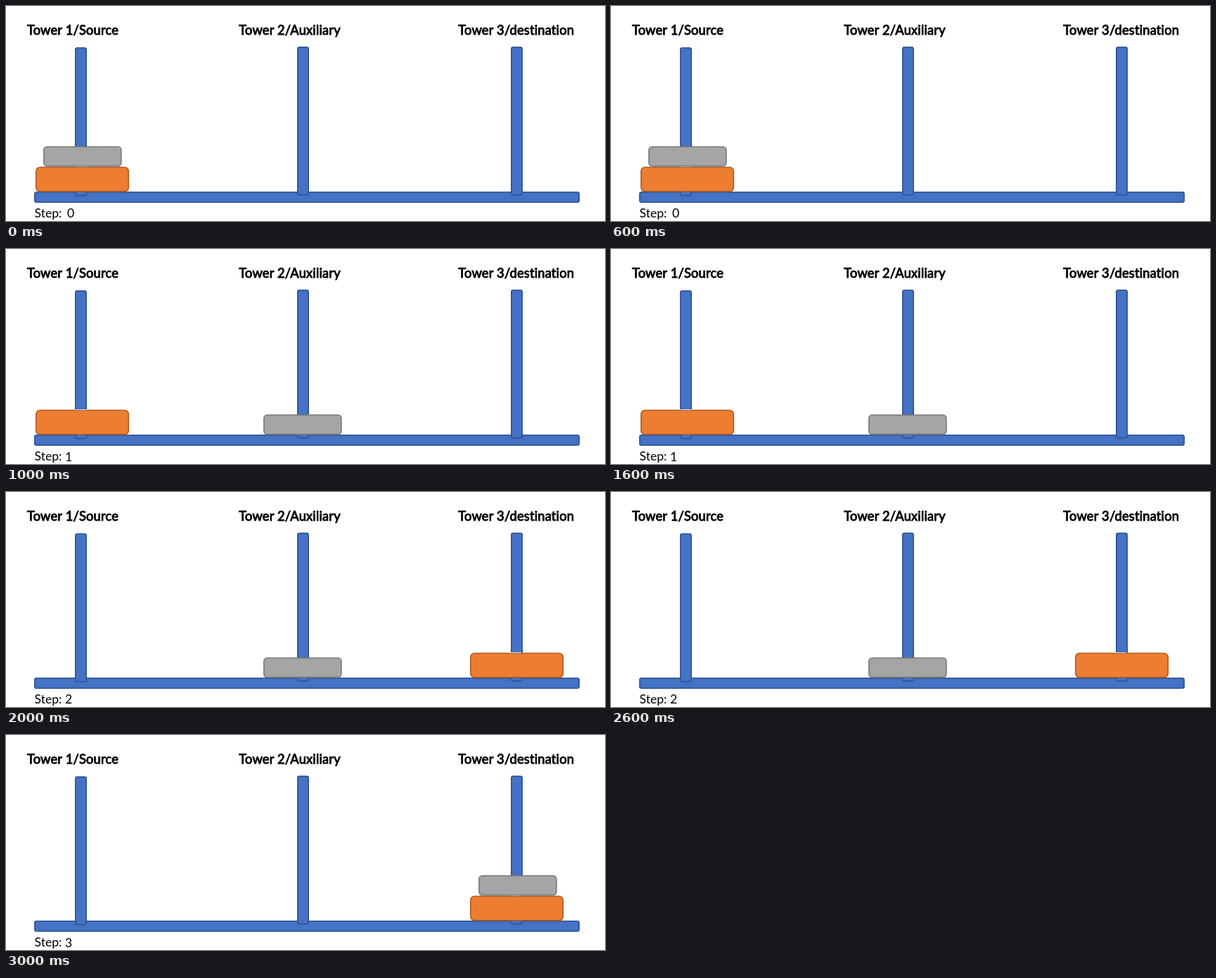
An HTML page that plays this animation: 852x307 px, repeating every 4 s.

```html
<!DOCTYPE html>
<html lang="en">
<head>
<meta charset="utf-8">
<title>Tower of Hanoi, two disks</title>
<style>
  html, body { margin: 0; width: 100%; height: 100%; overflow: hidden; background: #fff; }
  svg { display: block; width: 852px; height: 307px; }
  text { font-family: Lato, "Open Sans", sans-serif; }
  .wood { fill: #4472c4; stroke: #2f528f; stroke-width: 1.6; }
  .title { font-size: 18.3px; letter-spacing: .2px; text-anchor: middle; stroke: #000; stroke-width: .9; }
  .step { font-size: 17.6px; }
  .digit { text-anchor: middle; opacity: 0; animation: show 4s step-end infinite; }
  .small { fill: #a5a5a5; stroke: #787878; stroke-width: 1.6; animation: small 4s step-end infinite; }
  .large { animation: large 4s step-end infinite; }
  .large rect { fill: #ed7d31; stroke: #ae5a21; stroke-width: 1.6; }
  .large path { stroke: #e9ecf5; stroke-width: 1; }

  @keyframes small {
    0% { transform: translate(0, 0); }
    25%, 50% { transform: translate(313px, 36px); }
    75%, 100% { transform: translate(619px, 0); }
  }
  @keyframes large {
    0%, 25% { transform: translate(0, 0); }
    50%, 100% { transform: translate(618px, 0); }
  }
  @keyframes show {
    0% { opacity: 1; }
    25%, 100% { opacity: 0; }
  }
</style>
</head>
<body>
<svg viewBox="0 0 852 307">
  <rect class="wood" x="40.8" y="265.8" width="774.4" height="14.4" rx="2.5"/>
  <rect class="wood" x="98.8" y="59.8" width="15.4" height="211" rx="2.5"/>
  <rect class="wood" x="414.8" y="58.8" width="15.4" height="211" rx="2.5"/>
  <rect class="wood" x="718.8" y="58.8" width="15.4" height="211" rx="2.5"/>

  <g class="large">
    <rect x="42.8" y="230.3" width="131.5" height="34.4" rx="5.5"/>
    <path d="M98 229.5h17"/>
  </g>
  <rect class="small" x="53.9" y="201" width="110" height="27.6" rx="4.5"/>

  <text class="title" x="95" y="40.5">Tower 1/Source</text>
  <text class="title" x="403.5" y="40.5">Tower 2/Auxiliary</text>
  <text class="title" x="725.7" y="40.5">Tower 3/destination</text>

  <text class="step" x="40.5" y="302">Step:</text>
  <text class="step digit" x="92" y="302">0</text>
  <text class="step digit" x="89" y="303" style="animation-delay: -3s">1</text>
  <text class="step digit" x="89" y="302" style="animation-delay: -2s">2</text>
  <text class="step digit" x="89" y="303" style="animation-delay: -1s">3</text>
</svg>
</body>
</html>
```
